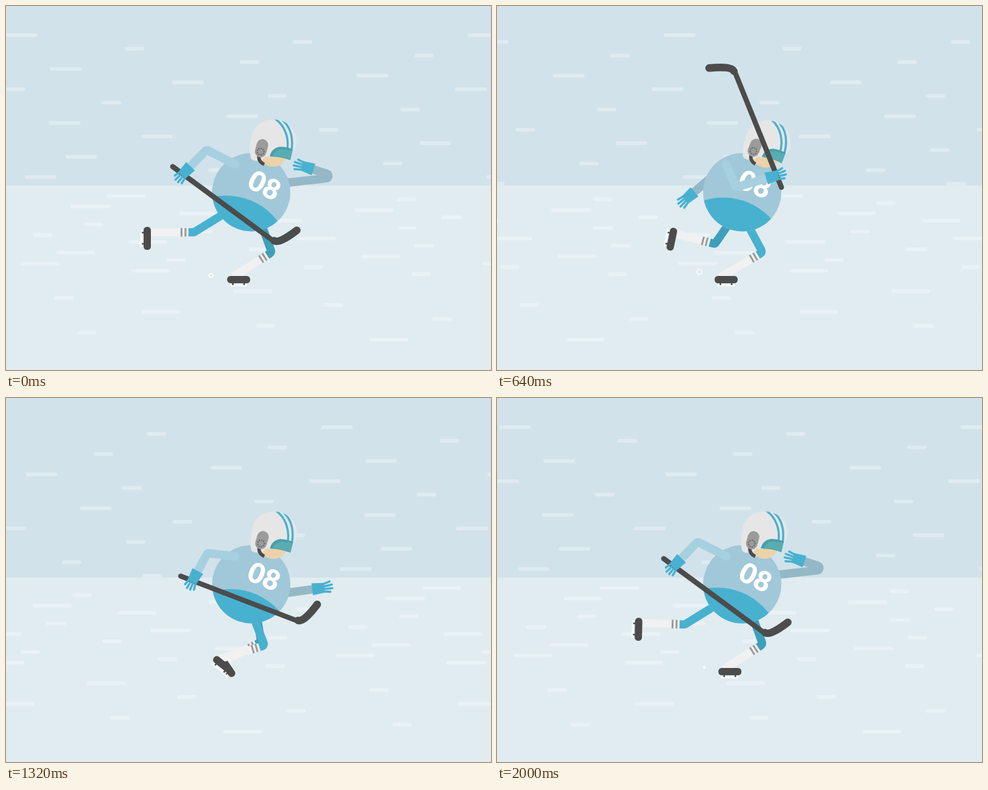
These frames come from a looping animation (800x600 px, 2.04 s). An HTML page with a canvas:

```html
<!DOCTYPE html>
<html lang="en">
<head>
<meta charset="utf-8">
<title>Ice hockey skater</title>
<style>
html, body { margin: 0; width: 100%; height: 100%; overflow: hidden; background: #e1ecf0; }
canvas { display: block; }
</style>
</head>
<body>
<canvas id="stage" width="800" height="600"></canvas>
<script>
const c = document.getElementById('stage').getContext('2d');
const LOOP = 2040, HALF = LOOP / 2, SPEED = 0.7594, TILE = 761.2;
const BLUE = '#48b1d0', DARK = '#4c4c4c', FAR_BLUE = '#3f9fbb';

const rad = deg => deg * Math.PI / 180;
const mix = (a, b, u) => a + (b - a) * u;
const ease = u => (u = Math.max(0, Math.min(1, u)), u * u * (3 - 2 * u));
// Arms go up from the loop start and come back down after one second
const swing = (t, up, down) => ease(t / up) - ease((t - 1000) / down);

let seed = 8;
const random = () => (seed = seed * 16807 % 2147483647) / 2147483647;

// Wind streaks: evenly scattered within bands of different density
const streaks = [];
for (const [count, top, bottom, wide] of [[23, 48, 293, 52], [23, 313, 442, 64], [8, 470, 550, 64]]) {
  for (let i = 0; i < count; i++) {
    streaks.push({
      x: (streaks.length * 0.618 + random() * 0.08) * TILE,
      y: mix(top, bottom, i / (count - 1)),
      w: random() < 0.4 ? wide : 32
    });
  }
}

// One stride: time, knee x, y, boot x, y, boot angle
const stride = [
  [0, 310, 373, 233, 383, 90],
  [300, 418, 402, 354, 443, 56],
  [640, 438, 406, 378, 451, 0],
  [1000, 438, 406, 376, 451, 0],
  [1300, 428, 408, 360, 441, 36],
  [1650, 351, 393, 269, 387, 100],
  [1760, 314, 380, 248, 351, 116],
  [LOOP, 310, 373, 233, 383, 90]
];
// Head tilt: time, degrees
const nod = [[0, 0], [280, 6.5], [640, 7.5], [1000, 1], [1320, 1.5], [1760, 7], [LOOP, 0]];
// Far arm: elbow x, y, hand x, y
const farArm = [[547, 282, 490, 264], [465, 321, 523, 313], [380, 260, 312, 318]];

// Smooth monotone interpolation through timed rows
function pose(rows, t) {
  const i = rows.findIndex(row => row[0] > t) - 1;
  const h = rows[i + 1][0] - rows[i][0], u = (t - rows[i][0]) / h, v = 1 - u;
  return rows[i].slice(1).map((a, k) => {
    const b = rows[i + 1][k + 1];
    const rate = j => rows[j] && rows[j + 1]
      ? (rows[j + 1][k + 1] - rows[j][k + 1]) / (rows[j + 1][0] - rows[j][0]) : 0;
    const slope = j => {
      const p = rate(j - 1), q = rate(j);
      return p * q <= 0 ? 0 : 2 * p * q / (p + q);
    };
    return a * v * v * (1 + 2 * u) + b * u * u * (3 - 2 * u) +
      h * u * v * (v * slope(i) - u * slope(i + 1));
  });
}

function fill(color, path) {
  c.fillStyle = color;
  c.fill(new Path2D(path));
}

function line(color, width, path, cap = 'round') {
  c.strokeStyle = color;
  c.lineWidth = width;
  c.lineCap = cap;
  c.stroke(path instanceof Path2D ? path : new Path2D(path));
}

// Two segments with a rounded joint
function limb(color, width, x0, y0, x1, y1, x2, y2) {
  const path = new Path2D();
  path.moveTo(x0, y0);
  path.arcTo(x1, y1, x2, y2, 4);
  path.lineTo(x2, y2);
  line(color, width, path, 'butt');
}

function disc(color, x, y, r) {
  c.fillStyle = color;
  c.beginPath();
  c.arc(x, y, r, 0, 7);
  c.fill();
}

function ring(color, x, y, r, count, dot) {
  for (let k = 0; k < count; k++) {
    const a = k * 2 * Math.PI / count;
    disc(color, x + r * Math.cos(a), y + r * Math.sin(a), dot);
  }
}

function pill(color, x, y, w, h, r) {
  c.fillStyle = color;
  c.beginPath();
  c.roundRect(x, y, w, h, r);
  c.fill();
}

function turned(x, y, angle, draw) {
  c.save();
  c.translate(x, y);
  c.rotate(angle);
  draw();
  c.restore();
}

function drawScene(t) {
  c.fillStyle = '#d2e2ea';
  c.fillRect(0, 0, 800, 296);
  c.fillStyle = '#e1ecf0';
  c.fillRect(0, 296, 800, 304);
  for (const { x, y, w } of streaks) {
    const shift = (x - SPEED * t) % TILE;
    for (let left = shift - TILE; left < 800; left += TILE) {
      pill('rgba(255,255,255,.3)', left, y - 3, w, 6, 2.5);
    }
  }
}

// Ice chips fly off during each glide
function drawSparks(t) {
  for (let i = 0; i < 6; i++) {
    const k = i % 3, birth = 560 + 210 * k + (i < 3 ? 0 : HALF);
    const age = (t - birth + LOOP) % LOOP;
    if (age > 180) continue;
    const x = 342 - age * 0.1, y = 438 + 3 * k;
    c.globalAlpha = Math.min(1, (180 - age) / 110);
    if (age < 35) disc('#fff', x, y, 2 + age / 30);
    else ring('#fff', x, y, 2.5 + age / 45, 8, 1.2);
  }
  c.globalAlpha = 1;
}

// The far leg is drawn a little narrower in its reach
function drawLeg(hipX, t, squeeze, color) {
  let [kx, ky, bx, by, deg] = pose(stride, t % LOOP);
  kx = mix(kx, 440, squeeze);
  bx = mix(bx, 440, squeeze);
  const a = rad(deg), cos = Math.cos(a), sin = Math.sin(a);
  const ax = bx - 10 * cos + 4 * sin, ay = by - 10 * sin - 4 * cos;
  const shin = Math.atan2(ay - ky, ax - kx);
  turned(kx, ky, shin, () => {
    line('#f2f1f2', 13, `M4 0H${Math.hypot(ax - kx, ay - ky)}`, 'butt');
    line('#999', 3, 'M14-7V7M20.500-7V7', 'butt');
  });
  limb(color, 13.5, hipX, 322, kx, ky, kx + 9 * Math.cos(shin), ky + 9 * Math.sin(shin));
  turned(bx, by, a, () => {
    pill('rgba(255,255,255,.8)', -15, 8, 29, 3, 1.5);
    line(DARK, 2.5, 'M-9.500 5V9M9 5V9', 'butt');
    pill(DARK, -19, -6, 38, 12, 5.5);
  });
}

function drawArm(sx, sy, [ex, ey, hx, hy], color) {
  const a = Math.atan2(hy - ey, hx - ex);
  disc(color, sx, sy, 7);
  limb(color, 14, sx, sy, ex, ey, hx - 14 * Math.cos(a), hy - 14 * Math.sin(a));
  turned(hx, hy, a, () => {
    fill(BLUE, 'M-18-10L-18 10L2 8L2-8Z');
    line(BLUE, 3.6, 'M0-6L12-9M0-2L15-3.500M0 2L15 2.500M0 6L11 8');
  });
}

function drawBody(deg) {
  turned(404.5, 307, rad(deg), () => {
    disc('#a1c8d8', 0, 0, 64.5);
    c.save();
    c.clip();
    disc(BLUE, -41.5, 112, 106.6);
    c.restore();
    c.translate(22, -11.5);
    c.rotate(rad(27));
    c.fillStyle = '#fff';
    c.font = '900 46px Lato, Arial, sans-serif';
    c.textAlign = 'center';
    c.fillText('08', 0, 16.5);
  });
}

function drawHead(deg) {
  turned(430, 262, rad(deg), () => {
    c.translate(-430, -262);
    disc('#ecd2a8', 441, 242, 23);
    const shell = new Path2D('M404 251C401 238 403 224 405 215C409 197 424 187 441 187' +
      'C465 187 479 205 479 222C479 229 477 236 472 240L436 249Q432 249 428 248Q424 256 414 255Q407 256 404 251Z');
    c.fillStyle = '#e6e6e7';
    c.fill(shell);
    line(DARK, 5.5, 'M417 246Q416 257 426 261', 'butt');
    c.save();
    c.clip(shell);
    line(BLUE, 3.5, 'M444 186C459 196 467 216 464 236M457 189C469 200 474 217 471 238');
    c.restore();
    line('#9b9b9b', 19, 'M423 229L420 240');
    ring('#666', 420, 240, 5.5, 9, 1.2);
    fill('#4a9fa8', 'M435 248Q438 234 452 232Q462 232 473 236L469 254Q453 248 435 248Z');
    fill('#58adb3', 'M440 247Q443 238 454 236L472 238L469 253Q455 248 440 247Z');
  });
}

function drawStick(x, y, angle) {
  turned(x, y, angle, () => {
    c.translate(-21, 0);
    line(DARK, 8.5, 'M0 0H204');
    line(DARK, 12.5, 'M207-1Q217-2 227-37');
  });
}

// Shoulder, elbow and stick all turn with one swing value
function drawStickArm(p) {
  const sx = 378, sy = 261, dip = 19 * Math.sqrt(Math.max(0, p * (1 - p)));
  const upper = rad(mix(207, 67, p) - dip), fore = rad(mix(134, -16, p));
  const upperLen = mix(53, 41, p) - dip, foreLen = mix(56, 70, p) - dip;
  const ex = sx + upperLen * Math.cos(upper), ey = sy + upperLen * Math.sin(upper);
  const hx = ex + foreLen * Math.cos(fore), hy = ey + foreLen * Math.sin(fore);
  drawStick(hx, hy, rad(mix(36.4, -112, p)));
  drawArm(sx, sy, [ex, ey, hx, hy], '#a6d0e0');
}

function drawFarArm(q) {
  const i = q < 0.5 ? 0 : 1;
  const joints = farArm[i].map((v, k) => mix(v, farArm[i + 1][k], q * 2 - i));
  drawArm(430, 295, joints, '#94b8c6');
}

function draw(t) {
  drawScene(t);
  drawFarArm(swing(t, 400, 640));
  drawLeg(408, t + HALF, 0.125, FAR_BLUE);
  drawLeg(393, t, 0, BLUE);
  drawSparks(t);
  drawBody(-6 * Math.sin(Math.PI * t / HALF) ** 2);
  drawHead(pose(nod, t)[0]);
  drawStickArm(swing(t, 500, 400));
}

const start = performance.now();
function tick() {
  const t = (performance.now() - start) % LOOP;
  draw(Math.floor(t / 40) * 40);
  requestAnimationFrame(tick);
}
tick();
</script>
</body>
</html>
```
